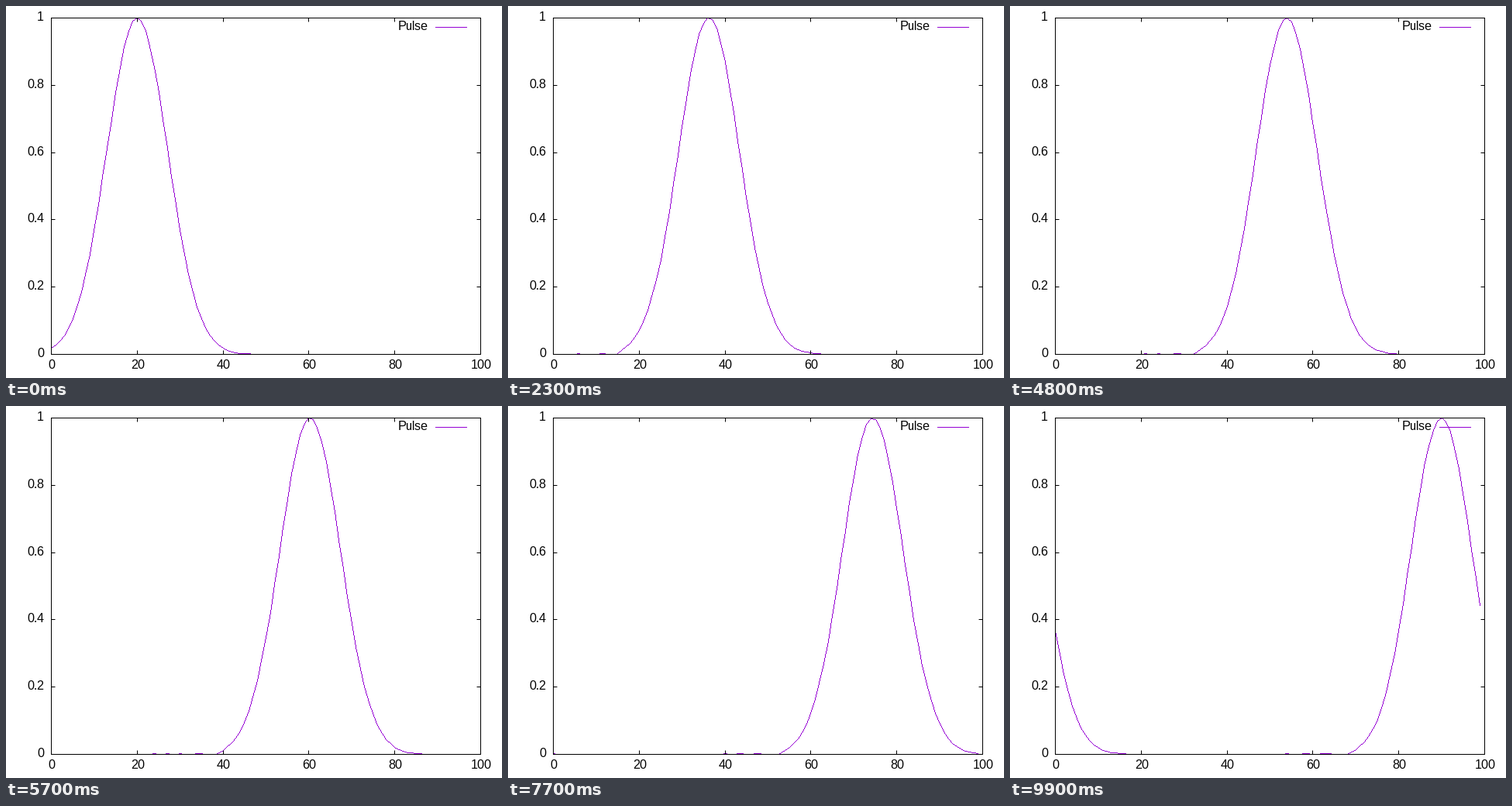
Animation of 640 by 480 pixels, one loop 10 s. Source, as a matplotlib script:

```python
import numpy as np
import matplotlib.pyplot as plt
from matplotlib.animation import FuncAnimation
from matplotlib.colors import to_rgb

W, H, DPI = 640, 480, 100
PX = 72 / DPI                          # one pixel in points
LEFT, RIGHT, TOP, BOTTOM = 58, 612, 15, 449
WIDE, TALL = RIGHT - LEFT, BOTTOM - TOP
CELLS, FRAMES = 100, 100
COURANT = 1 / np.sqrt(2)
VIOLET = to_rgb("#9400d3")

plt.rcParams.update({
    "font.family": "Liberation Sans",
    "font.size": 16 * PX,
    "text.hinting": "default",
    "text.hinting_factor": 1,
})


def gauss(x):
    return np.exp(-((x - 20) / 10) ** 2)


def simulate():
    """Leapfrog wave on a staggered periodic grid, moving right."""
    i = np.arange(CELLS)
    e = gauss(i)
    h = gauss(i + 0.5 - COURANT / 2)
    states = []
    for _ in range(FRAMES):
        states.append(e)
        e = e - COURANT * (h - np.roll(h, 1))
        h = h - COURANT * (np.roll(e, -1) - e)
    return states


def pixel(v):
    return np.floor(np.asarray(v) + 0.5).astype(int)


def stroke(img, xs, ys):
    """One-pixel polyline without smoothing, cut off at the plot floor."""
    for x0, y0, x1, y1 in zip(xs, ys, xs[1:], ys[1:]):
        n = max(abs(x1 - x0), abs(y1 - y0)) + 1
        px = pixel(np.linspace(x0, x1, n))
        py = pixel(np.linspace(y0, y1, n))
        inside = py <= BOTTOM
        img[py[inside], px[inside]] = (*VIOLET, 1)


def draw(values):
    img = np.zeros((H, W, 4))
    img[..., :3] = VIOLET
    stroke(img, [554, 594], [27, 27])  # key sample
    stroke(img, grid, pixel(BOTTOM - TALL * values))
    return img


def label(x, y, text, ha):
    fig.text(x / W, 1 - y / H, text, ha=ha, va="baseline")


fig = plt.figure(figsize=(W / DPI, H / DPI), dpi=DPI, facecolor="white")
grid = pixel(LEFT + WIDE * np.arange(CELLS) / 100)
states = simulate()
canvas = fig.figimage(draw(states[0]), origin="upper", zorder=-1)

ax = fig.add_axes([LEFT / W, 1 - BOTTOM / H, WIDE / W, TALL / H])
ax.set(xlim=(0, 100), ylim=(0, 1), facecolor="none")
ax.set_xticks(range(0, 101, 20))
ax.set_yticks(np.arange(6) / 5)
ax.tick_params(direction="in", length=5 * PX, width=PX, top=True, right=True,
               labelbottom=False, labelleft=False)
for spine in ax.spines.values():
    spine.set_linewidth(PX)

for k in range(6):
    label(pixel(LEFT + WIDE * k / 5) + 1, 468, str(20 * k), "center")
    label(49, pixel(BOTTOM - TALL * k / 5) + 4, f"{k / 5:g}", "right")
label(545, 31, "Pulse", "right")


def update(n):
    canvas.set_data(draw(states[n]))
    return canvas,


anim = FuncAnimation(fig, update, frames=FRAMES, interval=100, repeat=True,
                     repeat_delay=0)
plt.show()
```
